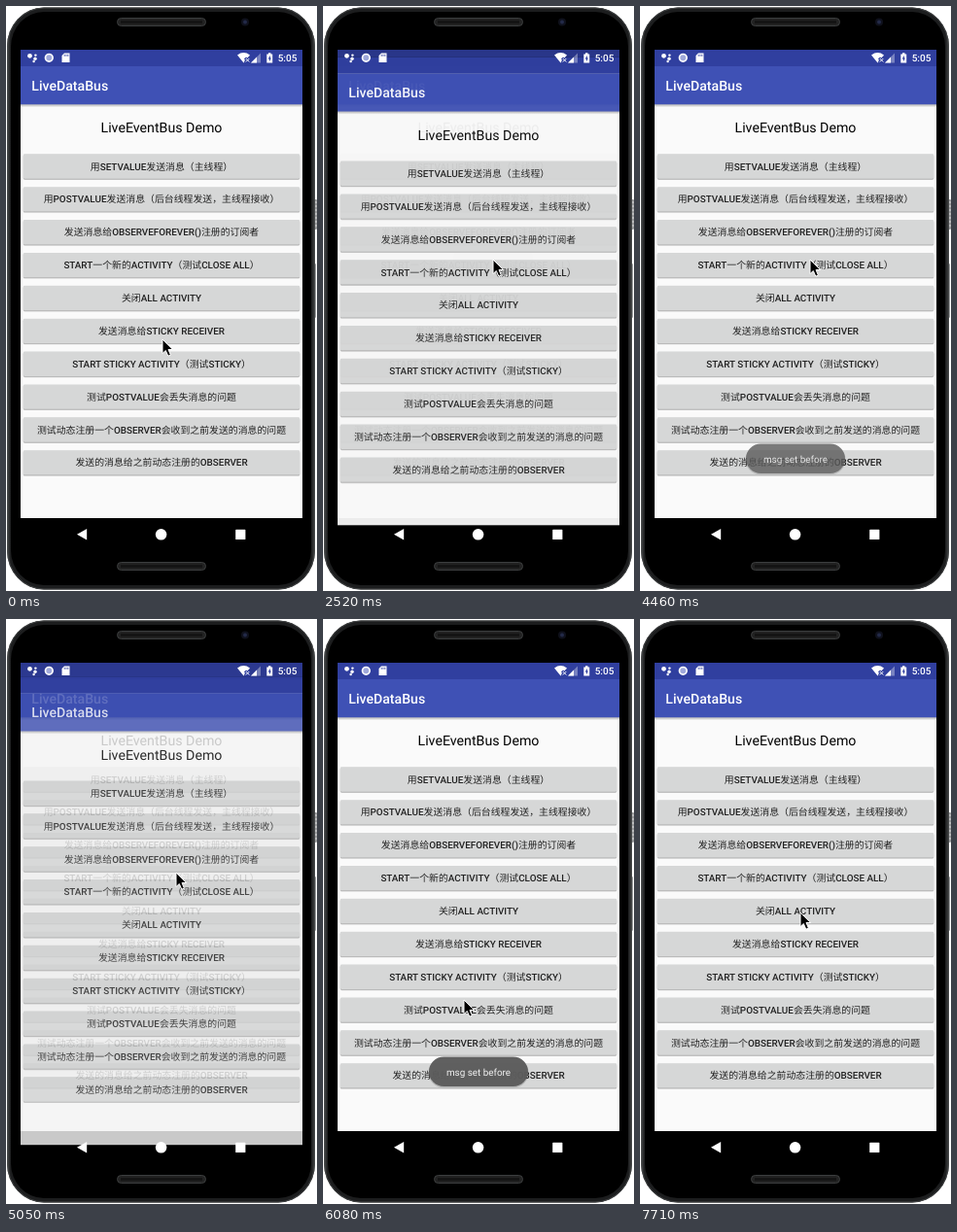
Write an HTML page that moves like this. It is 320 by 602 pixels and loops after 8 s.

```html
<!DOCTYPE html>
<html lang="zh-CN">
<head>
<meta charset="utf-8">
<title>LiveEventBus Demo</title>
<style>
html, body { margin: 0; width: 100%; height: 100%; overflow: hidden; background: #fff; }
svg { display: block; width: 320px; height: 602px; }
text { font-family: Roboto, "Noto Sans CJK SC", "Noto Sans CJK", sans-serif; text-rendering: geometricPrecision; }
.label { font-size: 9.88px; fill: #212121; text-anchor: middle; }
.label tspan, .medium { font-weight: 500; }
</style>
</head>
<body>
<svg viewBox="0 0 320 602" xmlns="http://www.w3.org/2000/svg">
  <defs>
    <linearGradient id="rim" x2="1" y2="0">
      <stop offset="0" stop-color="#4a4c4d"/><stop offset=".012" stop-color="#1c1d1e"/>
      <stop offset=".988" stop-color="#1c1d1e"/><stop offset="1" stop-color="#444647"/>
    </linearGradient>
    <linearGradient id="barShade" x2="0" y2="1">
      <stop offset="0" stop-opacity=".28"/><stop offset="1" stop-opacity="0"/>
    </linearGradient>
    <clipPath id="screen"><rect x="15" y="45" width="290" height="516"/></clipPath>
    <clipPath id="pressed"><rect x="17.8" y="253.9" width="284.4" height="25.4" rx="1.4"/></clipPath>
    <g id="app">
      <rect x="15" y="45" width="290" height="516" fill="#000"/>
      <rect x="15" y="62" width="290" height="465" fill="#fafafa"/>
      <rect x="15" y="45" width="290" height="17" fill="#303f9f"/>
      <rect x="15" y="62" width="290" height="39.3" fill="#3f51b5"/>
      <rect x="15" y="101.3" width="290" height="3" fill="url(#barShade)"/>
      <text class="medium" x="26.3" y="87" font-size="14.1" fill="#fff">LiveDataBus</text>
      <text x="160" y="130.4" font-size="14.2" text-anchor="middle" fill="#000">LiveEventBus Demo</text>
      <g id="buttons"></g>
    </g>
  </defs>

  <!-- phone body -->
  <rect x="316" y="199" width="4" height="31" rx="1" fill="#9a9b9c"/>
  <path d="M319 201v28" stroke="#dcdcdc" stroke-dasharray="2 2"/>
  <rect x="316" y="265" width="2.6" height="56" rx="1" fill="#555859"/>
  <rect x="1" y="1.5" width="317" height="599" rx="38" ry="40" fill="url(#rim)"/>
  <rect x="1.5" y="2" width="316" height="598" rx="37.5" ry="39.5" fill="none" stroke="#444647"/>
  <rect x="5" y="6" width="309" height="590" rx="34" ry="36" fill="#000"/>
  <g fill="#222" stroke="#3c3e3f">
    <rect x="114.5" y="12.5" width="91" height="8" rx="4"/>
    <rect x="114.5" y="572.5" width="91" height="8" rx="4"/>
  </g>
  <path d="M118 16.5h84M118 576.5h84" stroke="#141414" stroke-width="3"/>
  <circle cx="246" cy="16.5" r="4" fill="#0f111c"/>
  <circle cx="246" cy="16.5" r="2" fill="#232a48"/>

  <g clip-path="url(#screen)">
    <use href="#app"/>
    <g clip-path="url(#pressed)">
      <rect id="pressTint" x="17" y="253" width="286" height="27" opacity="0"/>
      <circle id="ripple" cx="175" cy="267" opacity="0"/>
    </g>
    <rect id="dim" x="15" y="45" width="290" height="516" opacity="0"/>
    <use id="incoming" href="#app" visibility="hidden"/>
  </g>

  <!-- status bar -->
  <g fill="#fff">
    <circle cx="24.5" cy="51.3" r="2.4"/><circle cx="30.4" cy="50.6" r="1.2"/>
    <circle cx="30" cy="54.2" r="1.7"/><circle cx="28.6" cy="57" r="1.2"/>
    <circle cx="44.3" cy="53.3" r="3.8" fill="#9fa8da" stroke="#fff" stroke-width="1.7"/>
    <path d="M60 48.5h5.5v9.6h-8v-7z"/>
    <path d="M60.2 49.8v2M62 49.8v2M63.8 49.8v2" stroke="#303f9f" stroke-width=".8"/>
    <path d="M238 50.4Q244.5 45.8 251 50.4L244.5 58.5z"/>
    <path d="M246 53.5l4.5 4.5m0-4.5l-4.5 4.5" stroke="#303f9f" stroke-width="3"/>
    <path d="M246.8 54l3.5 3.5m0-3.5l-3.5 3.5" stroke="#fff"/>
    <path d="M252 58.4L262 48.4v10z" opacity=".35"/>
    <path d="M252 58.4L258 52.4v6z"/>
    <path d="M268.3 49.5h1.7v-1.2h2.5v1.2h1.7v9h-5.9z"/>
    <path d="M271.8 50.8l-2.1 3.6h1.2v2.8l2-3.7h-1.1z" fill="#303f9f"/>
    <text class="medium" x="279.7" y="57" font-size="10">5:05</text>
  </g>

  <!-- navigation bar -->
  <g fill="#fff">
    <path d="M73 543.8L83.2 538v11.6z"/>
    <circle cx="159.6" cy="543.8" r="5.8"/>
    <rect x="236.2" y="538.8" width="10.2" height="10.2" rx=".6"/>
  </g>

  <g id="toast" opacity="0">
    <rect x="108.5" y="451.2" width="103" height="31" rx="15.5" opacity=".16"/>
    <rect x="109" y="450.5" width="102" height="30.6" rx="15.3" fill="#5c5c5c" fill-opacity=".96"/>
    <text x="160" y="470.4" font-size="9.88" text-anchor="middle" fill="#f2f2f2">msg set before</text>
  </g>

  <path id="cursor" d="M0 0V14.6L3.3 11.5L5.8 17.2L8.4 16.1L6 10.5H10.7Z" fill="#000" stroke="#fff" stroke-width="1" stroke-linejoin="round"/>
</svg>
<script>
const LOOP = 8000, TICK = 148.2;
const $ = id => document.getElementById(id);
const clamp = v => Math.min(1, Math.max(0, v));

const labels = [
  "用SETVALUE发送消息（主线程）",
  "用POSTVALUE发送消息（后台线程发送，主线程接收）",
  "发送消息给OBSERVEFOREVER()注册的订阅者",
  "START一个新的ACTIVITY（测试CLOSE ALL）",
  "关闭ALL ACTIVITY",
  "发送消息给STICKY RECEIVER",
  "START STICKY ACTIVITY（测试STICKY）",
  "测试POSTVALUE会丢失消息的问题",
  "测试动态注册一个OBSERVER会收到之前发送的消息的问题",
  "发送的消息给之前动态注册的OBSERVER"
];
$("buttons").innerHTML = labels.map((label, i) => {
  const y = 165 + i * 33.87;
  const box = (dy, style) => `<rect x="17.8" y="${y - 12.7 + dy}" width="284.4" height="25.4" rx="1.4" ${style}/>`;
  const text = label.replace(/[ -~]+/g, "<tspan>$&</tspan>");
  return box(1.3, 'opacity=".2"') + box(0.5, 'opacity=".14"') + box(0, 'fill="#d6d7d7"') +
    `<text class="label" x="160" y="${y + 3.6}">${text}</text>`;
}).join("");

// tick, x, y of the pointer tip
const path = [
  [0, 161, 343], [1, 161, 339], [2, 163, 322], [3, 168, 293], [4, 173, 266],
  [5, 175, 256], [6, 175, 261], [34, 175, 261], [35, 173, 269], [37, 164, 312],
  [39, 151, 368], [41, 145, 392], [43, 145, 392], [45, 147, 384], [48, 156, 348],
  [51, 163, 317], [52, 165, 302]
];
function pointer(n) {
  const k = path.findIndex(p => p[0] >= n);
  if (k < 0) return path[path.length - 1].slice(1);
  if (k === 0) return path[0].slice(1);
  const [a, b] = [path[k - 1], path[k]];
  const u = (n - a[0]) / (b[0] - a[0]);
  return [1, 2].map(i => a[i] + (b[i] - a[i]) * u);
}

const launches = [2417, 4972];

function toastAlpha(since) {
  const enter = 1 - (1 - clamp((since - 283) / 400)) ** 2;
  const leave = clamp((since - 1864) / 400) ** 2;
  return enter * (1 - leave);
}

function draw(time) {
  const n = Math.min(53, Math.floor((time + 9) / TICK));
  const t = n * TICK;

  const [x, y] = pointer(n);
  $("cursor").setAttribute("transform", `translate(${x} ${y})`);

  const press = t - 2150;
  const pressing = press > 0 && t < launches[0] + 200;
  $("ripple").setAttribute("r", 12 + Math.max(0, press) * 0.08);
  $("ripple").setAttribute("opacity", pressing ? 0.1 : 0);
  $("pressTint").setAttribute("opacity", pressing ? 0.04 * clamp(press / 200) : 0);

  const start = t >= launches[1] ? launches[1] : launches[0];
  const since = t - start;
  const moving = since > 0 && since < 350;
  const shift = 41 * (1 - clamp(since / 350)) ** 5;
  const alpha = 1 - (1 - clamp(since / 200)) ** 4;
  const next = $("incoming");
  next.setAttribute("visibility", moving ? "visible" : "hidden");
  next.setAttribute("opacity", alpha);
  next.setAttribute("transform", `translate(0 ${shift.toFixed(1)})`);
  $("dim").setAttribute("opacity", moving ? 0.3 * clamp(since / 217) : 0);

  $("toast").setAttribute("opacity", Math.max(...launches.map(l => toastAlpha(t - l))));
}

const origin = performance.now();
function loop() {
  draw((performance.now() - origin) % LOOP);
  requestAnimationFrame(loop);
}
draw(0);
requestAnimationFrame(loop);
</script>
</body>
</html>
```
